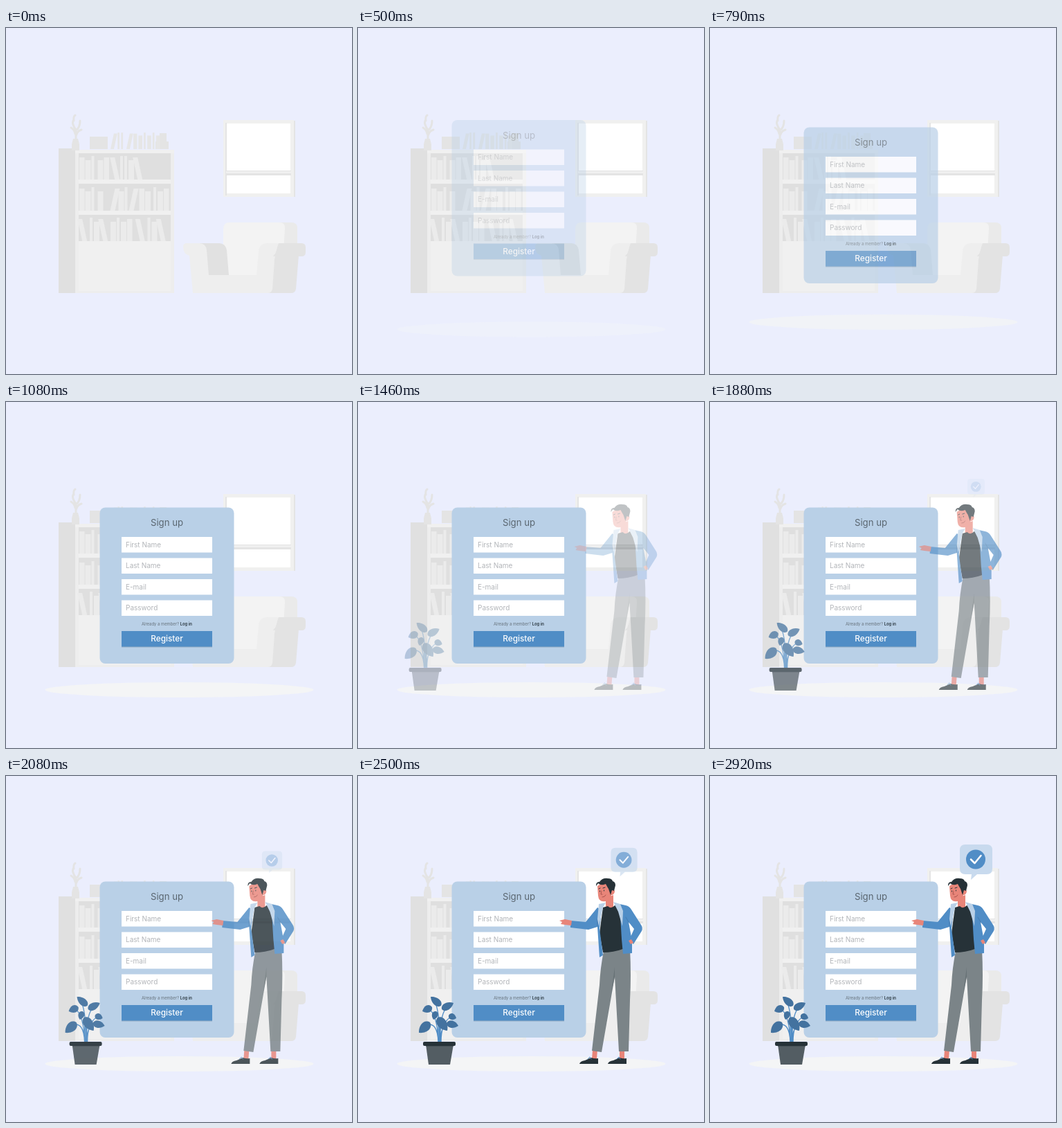
An HTML page for the animation above (2.96 s loop, 500 by 500 pixels).

```html
<!DOCTYPE html>
<html lang="en">
<head>
<meta charset="utf-8">
<title>Sign up</title>
<style>
html, body { margin: 0; width: 100%; height: 100%; overflow: hidden; background: #ebeefd; }
svg { display: block; width: 100%; height: 100%; font-family: Inter, Roboto, sans-serif; }
.label { font-size: 10px; fill: #b2b5b9; }
.blue { fill: #508dc6; }
.pale { fill: #b9d0e7; }
.dark { fill: #263238; }
.skin { fill: #e88579; }
.line { fill: none; stroke-linecap: round; stroke-linejoin: round; }
</style>
</head>
<body>
<svg viewBox="0 0 500 500">
  <g id="shelf">
    <path fill="#e0e0e0" d="M76 174h27v209H76z"/>
    <path fill="#ededed" d="M100 176h143v207H100z"/>
    <path fill="#f0f0f0" d="M105 308h133v72H105zM100 176h143v5H100zM105 219h133v6H105zM105 264h133v6H105z"/>
    <path fill="#dfdfdf" d="M105 181h133v38H105zM105 225h133v39H105zM105 270h133v38H105z"/>
    <path fill="#e4e4e4" d="M97 160h7l2 8v9H95v-9zM121 157h26v18h-26zM222 152h10v23h-10zM216 164h19v11h-19z"/>
    <path class="line" stroke="#e4e4e4" stroke-width="3" d="M101 160V147M100 153q-1-6-6-9M102 154q1-5 7-7M101 147q-6-8-4-13M101 148q6-4 6-14M98 134q-1-6 2-8"/>
  </g>

  <g id="window">
    <path fill="#e4e4e4" d="M415 134h3v110h-3z"/>
    <path fill="#f0f0ef" d="M314 133h102v111H314z"/>
    <path fill="#e4e4e4" d="M317 137h2v105h-2zM318 206h94v7h-94z"/>
    <path fill="#f0f0f0" d="M318 207h94v3h-94z"/>
    <path fill="#fff" d="M319 138h92v68h-92zM319 213h92v26h-92z"/>
  </g>

  <g id="sofa">
    <path fill="#eaeaea" d="M390 281h22q9 0 9 8v40h-31z"/>
    <path fill="#f3f3f3" d="M314 357V290q0-9 9-9h72q9 0 8 9l-4 67z"/>
    <path fill="#e1e1e1" d="M280 311h28q9 0 11 10l3 36h-31z"/>
    <path fill="#e3e3e3" d="M388 316h36l-5 61q-1 6-7 6h-34z"/>
    <path fill="#eee" d="M256 316q0-5 5-5h18q10 0 11 10l3 36h69l3-34q1-12 13-12h20v12q-9 2-10 12l-3 42q-1 6-7 6H270l-5-54q-9-2-9-13z"/>
    <path fill="#e3e3e3" d="M394 311h33q6 0 6 6v7q0 6-6 6h-41q4-4 5-9 1-5 3-10z"/>
  </g>

  <ellipse id="floor" cx="250.5" cy="416" rx="194" ry="11" fill="#f4f5f6"/>

  <g id="form">
    <rect class="pale" x="135.5" y="152.5" width="194" height="225.5" rx="8"/>
    <text x="232.5" y="179" text-anchor="middle" font-size="13.2" fill="#5a6670">Sign up</text>
    <path fill="#fff" d="M167 195h131v22.5H167zM167 225.5h131V248H167zM167 256h131v22.5H167zM167 286.5h131V309H167z"/>
    <g class="label">
      <text x="173" y="209.5">First Name</text>
      <text x="173" y="240">Last Name</text>
      <text x="173" y="270.5">E-mail</text>
      <text x="173" y="301">Password</text>
    </g>
    <text x="196" y="323" font-size="5.9" fill="#66727c">Already a member? <tspan font-weight="700" fill="#37454f">Log in</tspan></text>
    <path fill="#8fa9c4" d="M167 353h131v1.5H167z"/>
    <path class="blue" d="M167 331h131v22.5H167z"/>
    <text x="232.5" y="346" text-anchor="middle" font-size="11.8" font-weight="500" fill="#fff">Register</text>
  </g>

  <g id="person">
    <path class="skin" d="M339 396h7l-1 13h-7zM378 396h7v13h-7zM358 176l11-4v18l-4 5-7-5z"/>
    <path class="dark" d="M320 416q1-4 8-5l9-4q5 2 10 1v8zM361 416q1-4 8-5l9-4q5 2 10 1v8z"/>
    <path class="line" stroke="#508dc6" d="M332 409l3-3 2 3M374 409l3-3 2 3"/>
    <path fill="#7b8488" d="M355 253l38-4q2 40 0 75l-2 74h-14l-6-108-19 109-14-2 11-95q1-24 6-49z"/>
    <path fill="#687276" d="M371 276l-5 38 5-24z"/>
    <path class="dark" d="M354 190l7-2q5 5 10-1l8 3 4 60q-14 5-29 5l-5-28z"/>
    <path class="blue" d="M346 190l6 4-3 26 5 39-5 3-3-44-13 4-26-3v-10l22 2z"/>
    <path class="blue" d="M378 185l9 2q5 1 8 6l14 22q3 4 1 9l-12 19-6-6 7-16-8-10 5 27v18l-13 1-2-21z"/>
    <path class="line" stroke="#3f75a8" stroke-width=".7" d="M346 207v10M391 211l-4-7"/>
    <path class="pale" d="M348 185l10-2-4 7-6 27-2-10zM369 182l10 3 4 10-1 22-6-21z"/>
    <path class="skin" d="M309 209l-10-2-8 2 4 2-2 3 6 1 9 1zM391 238l4-2 3 5-4 2z"/>
    <path class="skin" d="M346 159q9-7 20-2l1 8q4-2 4 2-1 5-5 5-1 8-8 9-10 2-11-8z"/>
    <path class="dark" d="M344 158q0-5 5-5 4-6 12-5 6 0 7 4 4 1 4 6l-2 8-3-1-2 7-3-9q-2-3-4-7-7 3-11-1l-3 4z"/>
    <path class="line" stroke="#263238" stroke-width="1" d="M348 163l2-1M354 162l3-1M349.5 166v1M355.5 165v1"/>
    <path class="line" stroke="#9e4b46" stroke-width=".8" d="M352 166l-1 5 2 0M353 175q4 0 5-3"/>
  </g>

  <g id="plant">
    <path class="line" stroke="#508dc6" stroke-width="1.3" d="M117 385q2-34-4-54M119 385q-1-38 8-49M116 385q-1-40-14-49M120 385q0-30 15-37M119 385q0-26 14-27M116 385q-1-31-18-25M118 385v-29M116 385v-36"/>
    <path fill="#535d63" d="M98 388h40l-5 29h-31z"/>
    <path fill="#465056" d="M98 388h40l-.5 3h-39z"/>
    <rect class="dark" x="94" y="384" width="47" height="6" rx="2"/>
  </g>

  <g id="bubble">
    <path fill="#c8daee" d="M369 99h31q8 0 8 8v27q0 8-8 8h-14l-9 8 1-8h-9q-8 0-8-8v-27q0-8 8-8z"/>
    <circle class="blue" cx="384" cy="120.5" r="14"/>
    <path class="line" stroke="#fff" stroke-width="2.5" d="M377 120.500l5.500 5.500 9-11"/>
  </g>
</svg>
<script>
const $ = id => document.getElementById(id);

function addPath(parent, d, fill) {
  const path = document.createElementNS('http://www.w3.org/2000/svg', 'path');
  path.setAttribute('d', d);
  path.setAttribute('fill', fill);
  parent.append(path);
}

// Each letter is a book: [width, height, lean, advance]
const books = {
  t: [7.5, 32, 0, 8.5], s: [8, 28, 0, 9], n: [4, 34, 0, 6],
  '/': [7, 32, 7, 12], '\\': [7, 32, -7, 12], ' ': [0, 0, 0, 3]
};

function addRow(row, x, bottom, scale, fill) {
  for (const letter of row) {
    const [w, h, lean, step] = books[letter];
    const left = x + (lean < 0 ? -lean * 0.6 : 0);
    const tilt = lean * scale;
    if (w) addPath($('shelf'), `M${left} ${bottom}l${tilt} ${-h * scale}h${w * scale}l${-tilt} ${h * scale}z`, fill);
    x += step * (scale < 1 ? 0.85 : 1);
  }
}
addRow('/nn /tsnsns', 151, 175, 0.7, '#e6e6e6');
addRow('tsn st \\nns\\', 106, 219, 1, '#ebebeb');
addRow('tsn s   /sn/ ts nst', 106, 264, 1, '#ebebeb');
addRow('\\ ns\\ snst  \\ ns\\', 106, 308, 1, '#ebebeb');

function addLeaf(x, y, tipX, tipY, width) {
  const dx = tipX - x, dy = tipY - y, length = Math.hypot(dx, dy);
  const nx = -dy / length * width, ny = dx / length * width;
  const side = s => `${x + dx * 0.1 + nx * s} ${y + dy * 0.1 + ny * s} ${x + dx * 0.65 + nx * s} ${y + dy * 0.65 + ny * s}`;
  addPath($('plant'), `M${x} ${y}C${side(1)} ${tipX} ${tipY}C${x + dx * 0.65 - nx} ${y + dy * 0.65 - ny} ${x + dx * 0.1 - nx} ${y + dy * 0.1 - ny} ${x} ${y}`, '#43729f');
}
[
  [120, 332, 105, 319, 7], [121, 337, 138, 328, 7], [107, 334, 93, 340, 7], [131, 346, 142, 350, 6],
  [128, 357, 145, 361, 7], [104, 356, 88, 371, 9], [115, 349, 129, 368, 9], [113, 340, 109, 352, 6]
].forEach(leaf => addLeaf(...leaf));

function show(id, progress, transform) {
  $(id).setAttribute('opacity', progress);
  $(id).setAttribute('transform', transform);
}

const LOOP = 2960, HOLD = 250, STEP = 1000 / 24;

function draw() {
  const time = performance.now() % LOOP;
  const tick = time < HOLD ? 0 : Math.floor((time - HOLD + 5) / STEP) + 1;
  const progress = (start, length) => Math.min(1, Math.max(0, (tick - start) / length));
  const form = progress(0, 20), person = progress(22, 28), plant = progress(22, 25), bubble = progress(35, 30);
  show('form', form, `translate(0 ${-30 * (1 - form)})`);
  show('floor', form, `translate(0 ${30 * (1 - form)})`);
  show('person', person, `translate(${30 * (1 - person)} 0)`);
  show('plant', plant, `translate(${-30 * (1 - plant)} 0)`);
  show('bubble', bubble, `translate(384.5 124.5) scale(${0.44 + 0.56 * bubble}) translate(-384.5 -124.5)`);
  requestAnimationFrame(draw);
}
draw();
</script>
</body>
</html>
```
